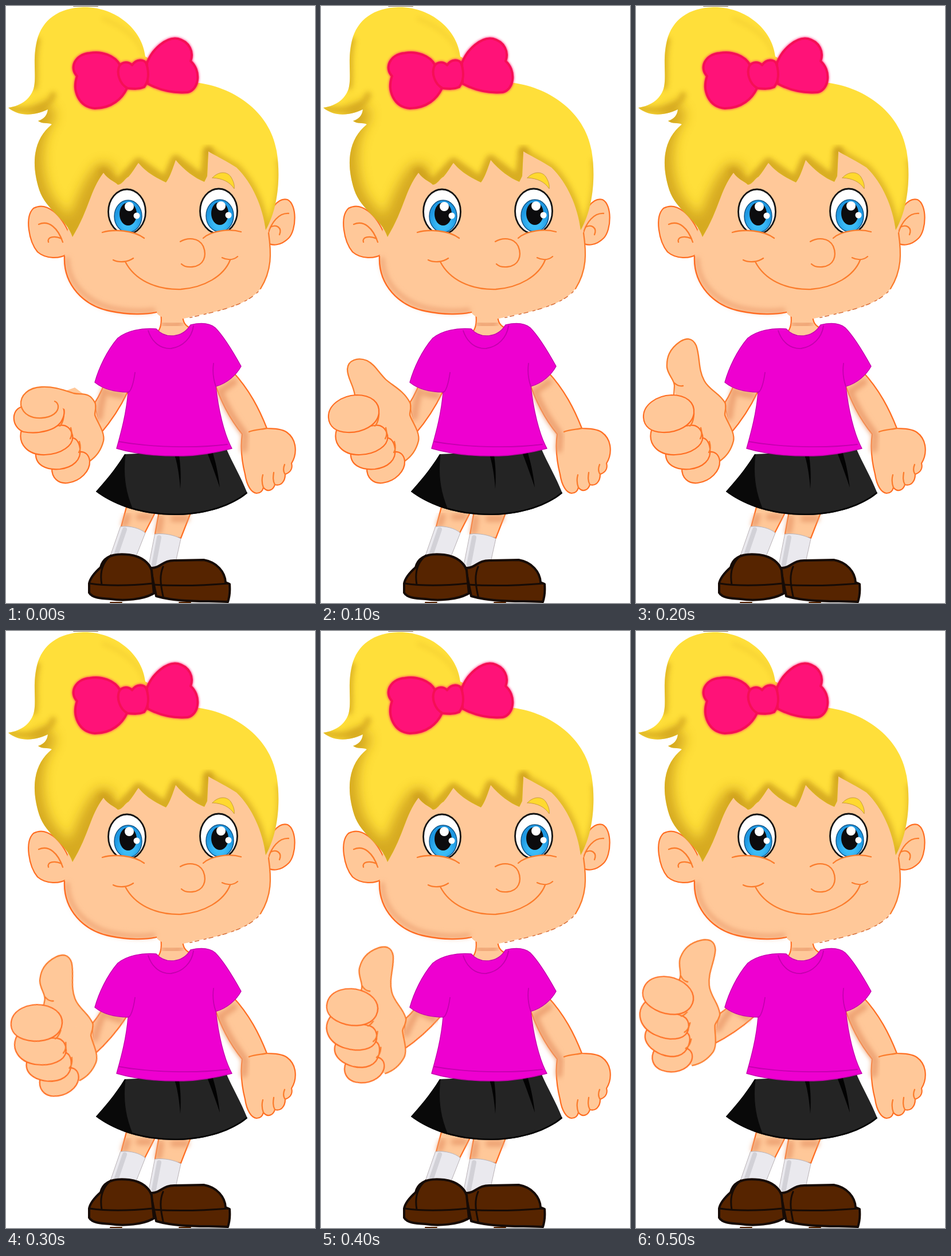
Write an HTML page that moves like this. It is 539 px wide and 1039 px high and loops after 600 ms.

```html
<!DOCTYPE html>
<html lang="en">
<head>
<meta charset="utf-8">
<title>Thumbs up</title>
<style>
  html, body { margin: 0; width: 100%; height: 100%; overflow: hidden; background: #fff; }
  svg { display: block; width: 100%; height: 100%; }

  .skin { fill: #ffc899; stroke: #ff6e22; stroke-width: 2.2; }
  .line { fill: none; stroke: #fb7c2c; stroke-width: 2.3; }
  .flat { stroke: none; }
  .shade { fill: none; stroke: #eda172; stroke-width: 11; filter: url(#soft); }
  .bow { fill: #ff1278; stroke: #f50f55; stroke-width: 4; }
  .glow { fill: #ff1268; stroke: #ff1268; stroke-width: 4; filter: url(#haze); }
  .seam { fill: none; stroke: #c400ae; stroke-width: 1.8; }
  .sock { fill: #eae9ee; stroke: #b9b2b6; stroke-width: 1; }
  .shoe { fill: #562400; stroke: #160b06; stroke-width: 4; }
  .welt { fill: none; stroke: #160b06; stroke-width: 3; }
  path { stroke-linecap: round; stroke-linejoin: round; }

  .arm, .fingers, .pose { animation: .6s step-end infinite; }
  .arm { transform-origin: 211px 656px; animation-name: raise; }
  .fingers { transform-origin: 215px 735px; animation-name: curl; }
  .folded { animation-name: folded; }
  .opening { animation-name: opening; }
  .up { animation-name: up; }

  @keyframes raise {
    0% { transform: rotate(0deg); }
    50% { transform: rotate(7.6deg); }
    66.666% { transform: rotate(15.3deg); }
    83.333%, 100% { transform: rotate(22.8deg); }
  }
  @keyframes curl {
    0% { transform: rotate(0deg); }
    50% { transform: rotate(2.5deg); }
    66.666%, 100% { transform: rotate(5deg); }
  }
  @keyframes folded {
    0% { visibility: visible; }
    16.666%, 100% { visibility: hidden; }
  }
  @keyframes opening {
    0% { visibility: hidden; }
    16.666% { visibility: visible; }
    33.333%, 100% { visibility: hidden; }
  }
  @keyframes up {
    0% { visibility: hidden; }
    33.333%, 100% { visibility: visible; }
  }
</style>
</head>
<body>
<svg viewBox="0 0 539 1039" preserveAspectRatio="none">
  <defs>
    <filter id="haze" x="-10%" y="-10%" width="120%" height="120%"><feGaussianBlur stdDeviation="2"/></filter>
    <filter id="soft" x="-20%" y="-20%" width="140%" height="140%"><feGaussianBlur stdDeviation="4"/></filter>
    <filter id="softer" x="-30%" y="-20%" width="160%" height="140%"><feGaussianBlur stdDeviation="10"/></filter>
    <radialGradient id="iris" cy=".7">
      <stop offset=".4" stop-color="#3bbcf8"/><stop offset="1" stop-color="#1e98e2"/>
    </radialGradient>
    <path id="hair" d="M4 177C27 174 45 160 49 140C53 118 46 94 54 60C63 24 92 3 135 2C190 1 238 40 243 88L330 133C395 140 460 182 472 252C479 292 476 350 453 390C448 350 430 308 402 281C385 270 368 262 353 253L351 296L346 306C330 300 310 285 296 268C290 285 286 298 279 307C262 299 245 290 231 273C224 283 220 290 214 297C207 300 203 311 195 311C188 304 178 302 170 290C146 322 146 352 116 402C106 370 70 356 58 320C42 270 50 230 80 206C72 202 64 206 56 200C66 197 72 190 73 180C52 190 24 194 4 177Z"/>
    <clipPath id="hairClip"><use href="#hair"/></clipPath>
    <clipPath id="skirtClip"><path d="M207 780C190 808 170 830 157 845C190 870 240 887 300 886C350 885 395 870 421 848C410 820 395 795 385 772Z"/></clipPath>
    <path id="index" d="M13 716C12 695 35 678 62 677C88 677 103 690 101 709C98 730 72 743 46 742C27 741 14 733 13 716Z"/>
    <g id="ribbon">
      <path d="M199 103C190 86 166 78 146 82C120 84 110 108 124 122C115 147 127 176 155 178C184 178 203 161 211 143Z"/>
      <path d="M246 99C255 75 280 53 300 57C320 62 328 80 322 96C340 111 338 145 317 150C290 152 265 145 247 135Z"/>
      <path d="M198 104C204 96 214 97 220 103C227 92 242 92 245 101C250 117 249 130 241 141C232 145 222 144 212 143C198 136 192 116 198 104Z"/>
    </g>
    <g id="eye">
      <ellipse rx="32.5" ry="39" fill="#fff" stroke="#151515" stroke-width="2.8"/>
      <ellipse cx="2" cy="8" rx="24" ry="28" fill="url(#iris)" stroke="#14598c" stroke-width="1.5"/>
      <ellipse cx="2" cy="4" rx="15" ry="20" fill="#0c0c0e"/>
      <g fill="#fff"><circle cx="4" cy="-9" r="8"/><circle cx="17" cy="7" r="5.5"/></g>
    </g>
  </defs>

  <!-- legs -->
  <path class="skin" d="M210 872L201 906L242 917L260 882Z"/>
  <path class="skin" d="M267 880L260 919L305 926L323 880Z"/>
  <path class="shade" d="M212 888L207 902M232 889H250M270 892L266 915M292 892H314"/>
  <path class="sock" d="M200 906C216 904 234 909 243 917L226 960L183 955Z"/>
  <path class="sock" d="M260 919C276 917 294 921 305 927L295 972L248 980Z"/>
  <path d="M207 911L193 952M267 925L258 972" stroke="#d2d1d7" stroke-width="8" fill="none"/>

  <!-- shoes -->
  <path d="M182 1038H202M302 1038H322" stroke="#562400" stroke-width="2"/>
  <path class="shoe" d="M252 978C272 978 272 964 296 965L345 964C368 968 382 985 383 1003L390 1006C391 1018 390 1028 387 1037C345 1035 300 1038 262 1027Z"/>
  <path class="welt" d="M256 1007C300 1010 340 1009 388 1005M274 976C268 990 269 1005 274 1027"/>
  <path class="shoe" d="M145 1021V1005C147 995 156 985 165 977C170 956 190 952 215 955C238 958 250 970 254 982L258 1022C240 1033 205 1036 182 1032C165 1031 150 1030 145 1021Z"/>
  <path class="welt" d="M146 1005C180 1010 225 1008 255 1005M183 956C166 970 164 990 167 1007"/>

  <!-- skirt -->
  <g clip-path="url(#skirtClip)">
    <rect x="150" y="765" width="280" height="125" fill="#242424"/>
    <path d="M210 770C203 815 208 850 228 890H150V770Z" fill="#090909"/>
    <path d="M292 775C299 795 302 815 304 840C306 815 304 795 301 775ZM350 775C358 795 365 815 373 838C370 812 366 795 360 775Z" fill="#030303"/>
    <path d="M157 845C190 870 240 887 300 886C350 885 395 870 421 848" fill="none" stroke="#060606" stroke-width="5"/>
  </g>

  <!-- resting arm -->
  <path class="skin" d="M362 650C378 700 398 728 412 745C409 768 411 792 417 815C420 835 428 847 437 848C446 848 448 842 449 838C456 847 466 843 469 833C480 836 487 827 487 815C498 811 500 803 498 796C508 780 508 755 490 742C480 735 466 736 455 735C442 702 425 668 395 636Z"/>
  <path class="shade" d="M373 670C386 704 404 728 417 746L415 772M378 668L398 654"/>
  <path class="line" d="M424 741C434 737 445 737 455 735M449 838C446 830 446 823 448 816M469 833C465 826 466 819 467 812M487 815C483 810 484 803 486 798"/>

  <!-- waving arm -->
  <g class="arm">
    <path class="skin" d="M178 640C170 665 163 678 154 692L165 744C184 722 200 697 212 672L215 650Z"/>
    <path class="shade" d="M172 668C168 685 164 700 163 716M182 674L203 678"/>
    <path class="skin flat" d="M155 690C154 712 171 738 170 757C165 777 155 786 146 792L80 790L45 715L75 680L120 664Z"/>
    <path class="line" d="M155 689C159 700 154 706 155 712C160 726 173 742 170 757C165 777 155 786 146 792"/>
    <g class="fingers">
      <path class="skin" d="M80 803C79 822 92 832 108 830C130 827 147 809 146 792C145 781 138 775 128 776Z"/>
      <path class="skin" d="M52 777C50 799 70 808 94 806C117 803 132 790 129 770C127 756 120 750 112 752Z"/>
      <path class="skin" d="M27 738C20 762 38 782 68 781C96 780 119 765 116 747C113 734 104 728 94 730Z"/>
      <path class="line" d="M101 700C102 718 99 726 94 731M113 734C116 745 114 750 112 753M128 758C131 768 129 774 127 777"/>
    </g>

    <g class="pose folded">
      <path class="skin" d="M26 698C9 704 9 732 30 741C58 746 90 738 98 720C103 710 103 702 97 695Z"/>
      <path class="skin flat" d="M155 690C145 671 133 677 118 674C94 666 80 662 62 663C40 664 24 677 26 695C30 712 46 718 62 717C80 716 92 707 93 697L130 715V690Z"/>
      <path class="line" d="M155 690C145 671 133 677 118 674C94 666 80 662 62 663C40 664 24 677 26 695C30 712 46 718 62 717C80 716 92 707 91 696C90 691 88 689 85 688"/>
    </g>
    <g class="pose opening">
      <path class="skin flat" d="M155 690C144 669 125 661 113 650C99 636 94 624 80 617C64 611 47 616 46 632C46 648 56 658 61 682L100 710Z"/>
      <path class="line" d="M155 690C144 669 125 661 113 650C99 636 94 624 80 617C64 611 47 616 46 632C46 648 56 658 59 677"/>
      <use href="#index" class="skin"/>
    </g>
    <g class="pose up">
      <path class="skin flat" d="M155 690C145 673 128 669 119 652C108 632 112 610 105 591C98 576 87 578 77 584C58 597 53 612 54 629C56 643 67 650 67 661L69 682L100 710Z"/>
      <path class="line" d="M155 690C145 673 128 669 119 652C108 632 112 610 105 591C98 576 87 578 77 584C58 597 53 612 54 629C56 643 67 650 67 661L66 677M67 656C72 661 77 662 82 661"/>
      <use href="#index" class="skin fingers"/>
    </g>
  </g>

  <!-- neck and shirt -->
  <path class="skin" d="M270 535C273 556 268 566 260 572L290 590L326 562C312 558 308 550 308 535Z"/>
  <path class="shade" d="M276 553C284 557 296 557 304 552"/>
  <path d="M262 562C236 560 211 565 195 578C176 600 162 630 155 655C170 667 190 672 213 672C210 710 200 745 193 770C220 778 260 784 310 783C345 782 375 775 394 770C380 745 370 700 366 662C385 657 402 642 410 627C395 600 380 575 365 560C353 550 335 552 322 555C308 578 278 580 262 562Z" fill="#ee00d0" stroke="#c800b0" stroke-width="1.5"/>
  <path class="seam" d="M248 565C255 586 270 597 288 596C309 593 324 577 327 557M197 758C250 768 330 770 386 763M213 672C217 672 222 660 225 638M366 662C361 648 360 637 362 622"/>

  <!-- ears -->
  <path class="skin" d="M112 400C96 361 70 340 48 352C32 367 40 410 55 428C70 441 94 440 106 432Z"/>
  <path class="line" d="M57 380C75 372 91 387 99 411M97 405C84 399 71 402 74 411"/>
  <path class="skin" d="M450 395C458 350 476 333 491 337C508 345 507 390 493 404C480 417 464 419 452 410Z"/>
  <path class="line" d="M493 361C476 360 463 376 457 397M461 385C472 379 482 386 477 398"/>

  <!-- face -->
  <path class="skin flat" d="M130 280C112 350 106 395 102 440C101 485 135 522 182 531C215 538 245 537 262 533C270 547 300 549 325 540C370 532 420 522 444 492C464 460 463 430 458 395C455 340 420 250 380 240H180Z"/>
  <path class="shade" d="M107 440C108 482 140 515 185 526C215 532 240 532 258 529" style="stroke-width: 6px"/>
  <path class="line" d="M102 436C100 485 135 522 182 531C215 538 245 537 262 533" style="stroke: #ff6a20"/>
  <path class="line" d="M458 395C463 430 464 460 444 492"/>
  <path d="M440 497C415 522 370 531 318 543" fill="none" stroke="#d9713c" stroke-width="1.5" stroke-dasharray="4 9 7 5"/>

  <!-- eyes -->
  <use href="#eye" x="211" y="358"/>
  <use href="#eye" x="371" y="357"/>
  <path class="skin flat" d="M168 394C188 388 222 390 241 404L230 415H175ZM344 404C358 391 390 387 410 393L405 415H350Z"/>
  <path class="line" d="M168 394C188 388 222 390 241 404M344 404C358 391 390 387 410 393"/>

  <!-- nose and mouth -->
  <path class="line" d="M304 410C316 403 336 402 344 418C351 435 345 452 325 454C315 455 309 452 306 449M187 442C197 447 212 446 222 439M208 445C224 476 260 494 305 493C346 490 380 470 391 442M377 438C387 443 397 442 404 436"/>

  <!-- hair -->
  <use href="#hair" fill="#ffdf3a"/>
  <g clip-path="url(#hairClip)" fill="none" stroke="#cfa01c">
    <path d="M66 190C36 235 40 300 66 345L112 400C140 360 143 325 170 293" stroke-width="40" opacity=".85" filter="url(#softer)"/>
    <path d="M170 290L195 311L231 273L279 307L296 268L346 306L353 253" stroke-width="18" opacity=".8" filter="url(#soft)"/>
    <path d="M353 253L402 281C430 308 448 350 453 392" stroke-width="14" opacity=".6" filter="url(#soft)"/>
    <path d="M476 270C480 310 475 350 453 390" stroke-width="9" opacity=".5" filter="url(#soft)"/>
    <path d="M4 178C40 185 72 180 82 155M49 140C53 118 46 94 54 60" stroke-width="12" opacity=".65" filter="url(#soft)"/>
    <path d="M170 22C215 40 236 65 243 90" stroke-width="4" opacity=".3" filter="url(#soft)"/>
  </g>
  <path d="M118 0H160" stroke="#8b7355" stroke-width="2"/>
  <path d="M360 299C370 288 385 287 392 297C397 305 399 312 398 318C390 306 378 300 360 299Z" fill="#ffd92f" stroke="#c99b3c" stroke-width="1"/>

  <!-- bow -->
  <use href="#ribbon" class="glow"/>
  <use href="#ribbon" class="bow"/>
</svg>
</body>
</html>
```
